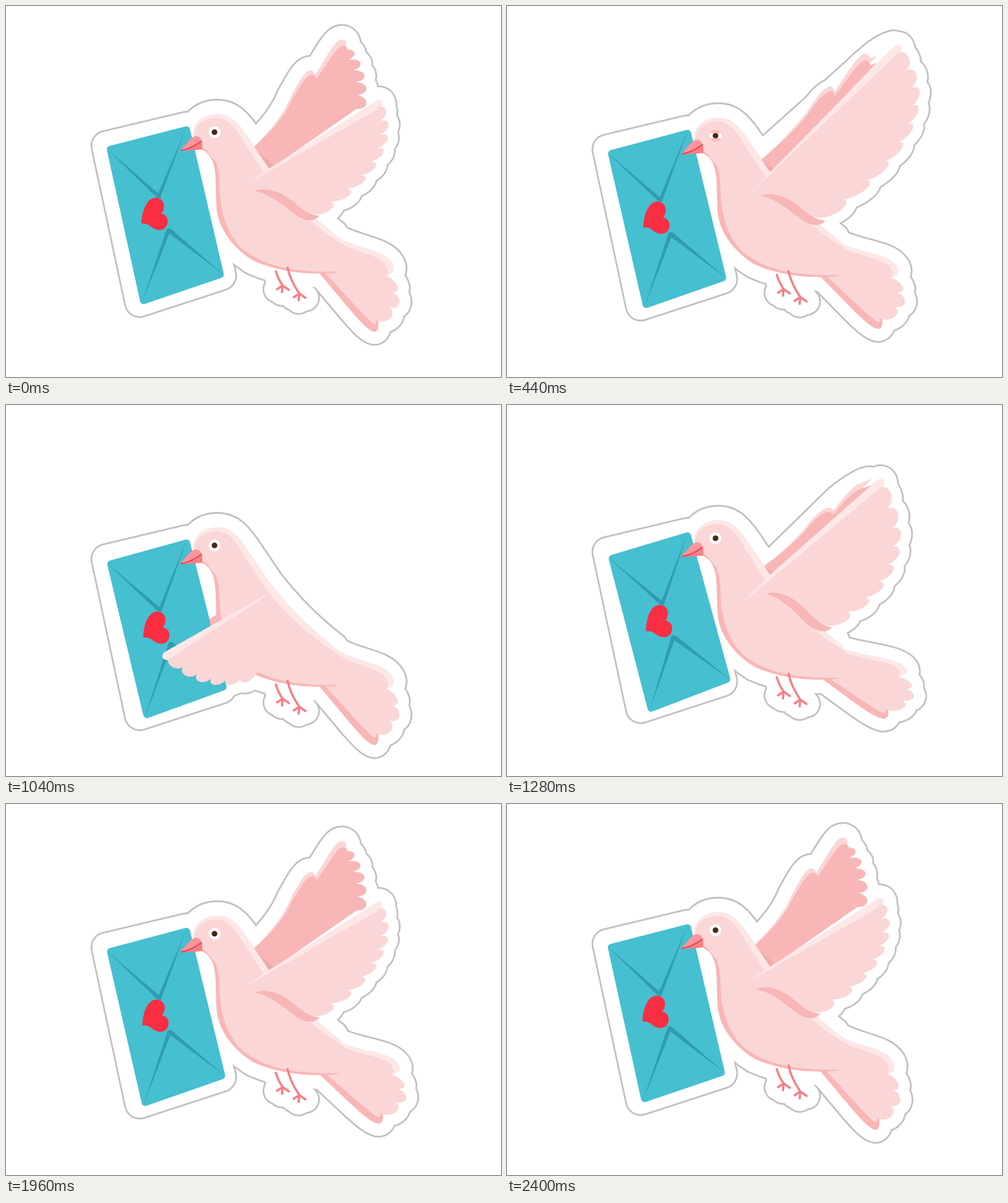
Recreate the animation shown at these times as an HTML page with a canvas. Size 800 px wide and 600 px high, loop 2.44 s.

```html
<!DOCTYPE html>
<html>
<head>
<meta charset="utf-8">
<title>Dove with a letter</title>
<style>
html, body { margin: 0; width: 100%; height: 100%; overflow: hidden; background: #fff; }
canvas { display: block; }
</style>
</head>
<body>
<canvas id="stage" width="800" height="600"></canvas>
<script>
const ctx = document.getElementById('stage').getContext('2d');
const STEP = 40, STEPS = 61;
const SKIN = '#fbd6d6', LIGHT = '#fde7e7', ROSE = '#f9b6b6', DARK = '#eeabab', CORAL = '#f87e84';

const path = d => new Path2D(d);

function moved(shape, matrix) {
  const result = new Path2D();
  result.addPath(shape, matrix);
  return result;
}

const about = (x, y, angle, sx, sy = sx) =>
  new DOMMatrix().translate(x, y).rotate(angle).scale(sx, sy).translate(-x, -y);

// Rounded feathers whose tips lie on a quadratic curve a-b-c; the notches are pulled towards the hub.
function feathers(a, b, c, count, depth, hub) {
  const onCurve = t => [0, 1].map(k => (1 - t) ** 2 * a[k] + 2 * t * (1 - t) * b[k] + t * t * c[k]);
  const notch = t => {
    const p = onCurve(t), dx = hub[0] - p[0], dy = hub[1] - p[1], k = depth / Math.hypot(dx, dy);
    return [p[0] + dx * k, p[1] + dy * k];
  };
  let d = 'L' + notch(0);
  for (let i = 0; i < count; i++) {
    const p = notch(i / count), q = notch((i + 1) / count), tip = onCurve((i + 0.5) / count);
    const control = side => [0, 1].map(k => (4 * tip[k] - (p[k] + q[k]) / 2) / 3 + side * 0.42 * (p[k] - q[k]));
    d += `C${control(1)} ${control(-1)} ${q}`;
  }
  return d;
}

const SHOULDER = [400, 285];
const SHADE = path('M402,299C430,290 455,308 472,323C486,335 496,338 506,339C500,350 482,348 468,338C448,322 430,306 402,299Z');

function raisedWing({ neck, spine, farFeathers = '', root, tip, curve, end, count, shade, contour }) {
  const [x, y] = tip;
  const farEdge = moved(path(`M${neck}${spine}L425,265Z`), about(412, 250, -2, 1.03));
  return {
    farEdge,
    far: path(`M${neck}${spine}${farFeathers}L425,265Z`),
    fold: path(`M${neck}L434,259L424,267Z`),
    nearEdge: path(`M${root}L425,263L${tip}c6,-6 13,-3 13,5l-4,14Z`),
    near: path(`M${root}L${x + 7},${y + 11}${feathers([x + 14, y + 2], curve, end, count, 14, SHOULDER)}L475,330L405,299Z`),
    shade: moved(SHADE, shade),
    contour: contour ? path(contour) : farEdge
  };
}

const middle = raisedWing({
  neck: [400, 229],
  spine: 'C430,203 452,176 463,150C470,140 482,116 491,112C498,109 501,115 502,118C515,100 530,73 540,66C547,62 554,66 552,74',
  farFeathers: feathers([556, 66], [590, 105], [581, 170], 5, 15, [420, 130]),
  root: [384, 291], tip: [596, 155], curve: [650, 249], end: [505, 343], count: 8,
  shade: new DOMMatrix()
});

const high = raisedWing({
  neck: [410, 244],
  spine: 'C445,215 470,190 488,167C500,150 512,134 522,132C528,131 529,137 530,140C545,120 565,88 578,82C584,81 588,89 587,90L598,86',
  root: [376, 313], tip: [625, 60], curve: [733, 187], end: [514, 343], count: 9,
  shade: new DOMMatrix().translate(8, 2),
  contour: 'M427,223L580,86Q605,62 625,57L630,75L440,260Z'
});

const rising = raisedWing({
  neck: [414, 250],
  spine: 'C450,225 470,205 485,188C498,172 510,162 520,161C526,161 526,167 528,165C545,145 560,125 578,122L590,118',
  root: [376, 312], tip: [597, 111], curve: [690, 255], end: [527, 351], count: 8,
  shade: new DOMMatrix().translate(17, -6).multiply(about(402, 299, 6.6, 1.07)),
  contour: 'M435,239L535,141Q570,113 585,111L590,125L440,260Z'
});

const none = new Path2D();
const low = {
  farEdge: none, fold: none, shade: none, contour: none,
  far: path('M329,323L346,313L348,331L331,336Z'),
  nearEdge: path('M428,279L259,375C252,378 250,386 257,389L275,392Z'),
  near: path(`M262,389L428,281L440,400L400,412${feathers([402, 421], [322, 450], [256, 390], 6, 10, [428, 281])}Z`)
};

const half = Object.fromEntries(Object.entries(rising).map(
  ([name, layer]) => [name, moved(layer, about(400, 300, 15, 0.85))]));

// Each pose is held for two steps.
const poses = [middle, low, low, half, rising, high];

const back = 'M303,213C301,190 318,175 342,175C362,175 374,188 388,208L425,263C450,295 475,322 503,346C515,356 528,367 ';
const body = path(back + '530,368L530,415L536,431C490,436 440,430 400,412C364,390 340,355 340,320L339,290C339,262 335,240 317,233Z');
const bodyEdge = path(back + '543,378L541,390L400,330L306,210Z');
const bodyFill = path('M304,211C306,190 322,181 341,181C360,182 372,198 383,218L417,270C440,302 470,332 500,354C515,366 528,376 546,386L543,429C480,432 420,425 380,391C352,362 346,325 345,290C345,265 341,250 330,239L317,228Z');

const tail = {
  edge: path('M500,360L538,375C560,387 585,391 605,400C622,408 631,422 624,432L614,437L540,420Z'),
  shade: path('M500,425L508,434L560,496C575,513 586,525 595,527C602,527 603,517 601,506L540,425Z'),
  fill: path(`M500,380L542,385C570,398 592,402 606,411C616,418 620,430 615,437${
    feathers([622, 434], [658, 485], [605, 517], 3, 12, [540, 440])}C600,514 597,516 592,513C570,492 545,463 516,432Z`)
};

const beak = path('M281,234C289,226 297,214 304,211C313,208 319,217 317,232C305,233 290,234 281,234Z');
const jaw = path('M281,234C298,232 308,225 317,217L317,232C305,233 290,234 281,234Z');
const mouth = path('M283,233.5C297,231 306,226 315,219');
const foot = 'l-9,6m9,-6l-1,11m1,-11l10,7';
const legs = path(`M436,429Q440,442 447,452${foot}M455,423Q459,443 474,465${foot}`);

const letter = path('M169,232L291.5,200.5L346,434L222.5,476Z');
const letterFrame = path('M162,226L292,195L348,436L216,479Z');
const folds = path('M164,232L246,303L291,198L249,311L243,309ZM220,479L260,360L266,360L351,434L264,368Z');
const heart = path('M219,352C219,336 226,309 243,310C256,311 259,326 251,336C262,337 264,351 258,358C250,366 240,362 232,355C228,352 223,351 219,352Z');

function fill(shape, color) {
  ctx.fillStyle = color;
  ctx.fill(shape);
}

function stroke(shape, color, width) {
  ctx.strokeStyle = color;
  ctx.lineWidth = width;
  ctx.stroke(shape);
}

function disc(x, y, r, color) {
  const shape = new Path2D();
  shape.arc(x, y, r, 0, 7);
  fill(shape, color);
  return shape;
}

// Triangle wave: rises by one per step and falls back.
const swing = (n, period) => Math.min(n % period, period - n % period);

function drawBorder(shapes) {
  for (const [color, extra] of [['#c1c1c1', 1.4], ['#fff', -1.4]]) {
    for (const [shape, radius] of shapes) {
      stroke(shape, color, 2 * (radius + extra));
      fill(shape, color);
    }
  }
}

function drawLetter(angle) {
  ctx.save();
  ctx.transform(...'abcdef'.split('').map(key => about(293, 198, angle, 1)[key]));
  fill(letter, '#46bfd0');
  stroke(letter, '#46bfd0', 12);
  fill(folds, '#309cb0');
  fill(heart, '#fa2e43');
  ctx.restore();
}

function drawEye(lid) {
  ctx.save();
  ctx.clip(disc(337, 204, 9.5, '#fff'));
  disc(337, 204, 4.6, '#4d2414');
  ctx.fillStyle = ROSE;
  ctx.fillRect(327, 194, 20, 10 * lid);
  ctx.fillRect(327, 214, 20, -10 * lid);
  ctx.restore();
}

function draw(n) {
  const wing = poses[Math.floor(n % 12 / 2)];
  const lift = n < 52 ? swing(n, 13) : 0;
  const tailMatrix = about(536, 402, 0, 1 + lift * 0.0367, 1 - lift * 0.0417);
  const [tailEdge, tailShade, tailFill] = [tail.edge, tail.shade, tail.fill].map(part => moved(part, tailMatrix));
  const lid = Math.max(0, 1 - 0.4 * Math.min(Math.abs(n - 12), Math.abs(n - 39)));

  ctx.fillStyle = '#fff';
  ctx.fillRect(0, 0, 800, 600);
  ctx.save();
  ctx.translate(0, 5.75 * swing(n, 10));
  ctx.lineJoin = ctx.lineCap = 'round';

  drawBorder([[letterFrame, 24], [body, 23.5], [legs, 22], [tailEdge, 21], [tailShade, 21], [tailFill, 19.5],
    [wing.contour, 23.5], [wing.far, 19], [wing.nearEdge, 22], [wing.near, 18]]);

  drawLetter(-0.54 * swing(n, 12));
  fill(wing.farEdge, SKIN);
  fill(wing.far, ROSE);
  fill(wing.fold, DARK);
  fill(tailEdge, LIGHT);
  fill(tailShade, ROSE);
  fill(tailFill, SKIN);
  fill(body, ROSE);
  fill(bodyEdge, LIGHT);
  fill(bodyFill, SKIN);
  stroke(legs, CORAL, 3.6);
  fill(beak, '#fa959b');
  fill(jaw, CORAL);
  stroke(mouth, '#dc4453', 2);
  drawEye(lid);
  fill(wing.nearEdge, LIGHT);
  fill(wing.near, SKIN);
  fill(wing.shade, ROSE);
  ctx.restore();
}

function tick() {
  draw(Math.floor(performance.now() / STEP) % STEPS);
  requestAnimationFrame(tick);
}
tick();
</script>
</body>
</html>
```
